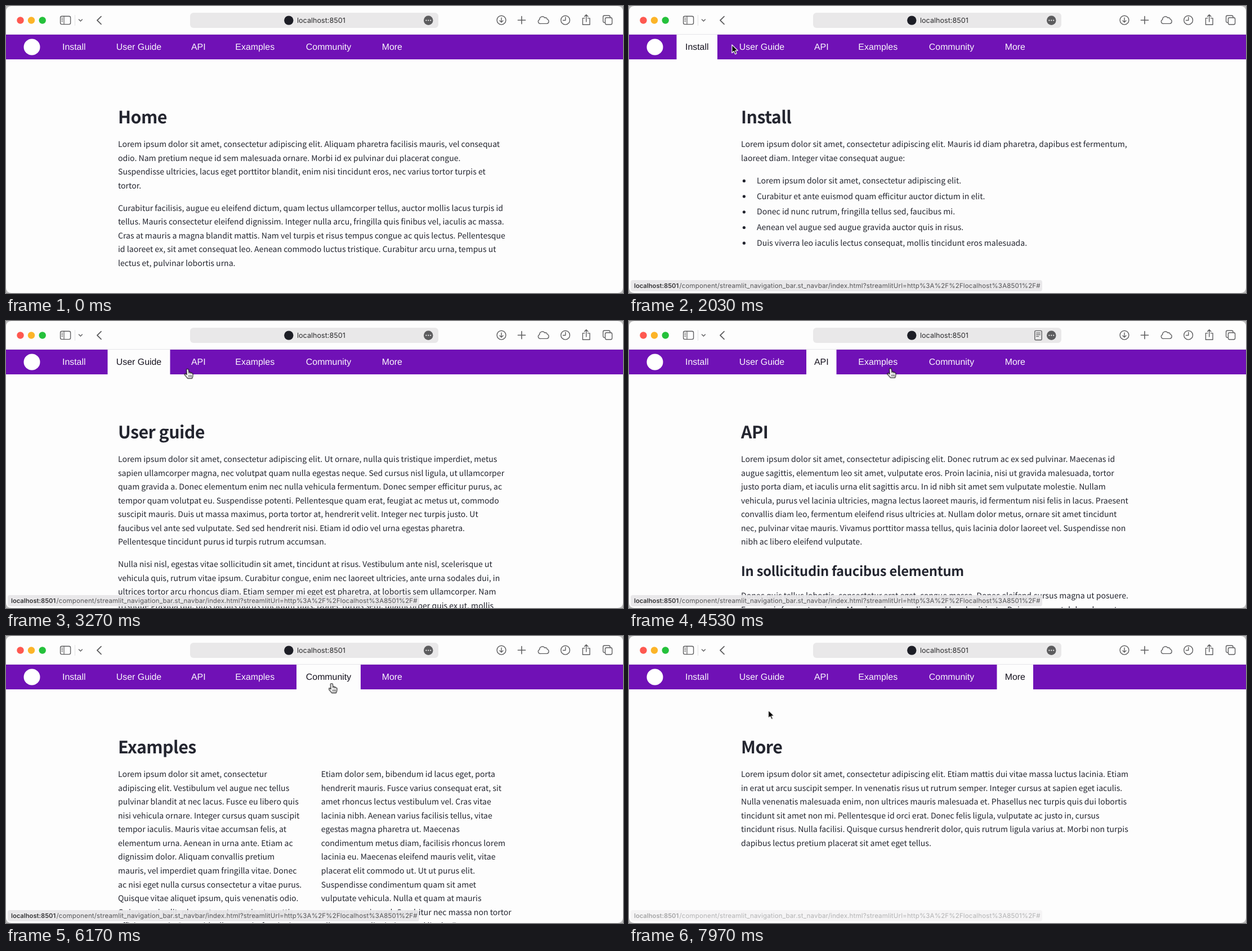
An HTML page for the animation above (8000 ms loop, 1096 by 511 pixels).

```html
<!DOCTYPE html>
<html lang="en">
<head>
<meta charset="utf-8">
<title>Navigation bar</title>
<style>
html, body { margin: 0; width: 100%; height: 100%; overflow: hidden; background: #bdbdbd; }
svg { display: block; width: 100vw; height: 100vh; text-rendering: geometricPrecision; }
.copy { font: 400 14.07px "Noto Sans CJK JP", "Noto Sans CJK SC", "Noto Sans CJK", sans-serif; fill: #23252f; }
.copy .h1 { font-size: 30.4px; font-weight: 700; letter-spacing: -.018em; }
.copy .h2 { font-size: 23.7px; font-weight: 700; letter-spacing: -.01em; }
.nav { font: 15.9px "Liberation Sans", Arial, sans-serif; text-anchor: middle; fill: #faf7fd; }
.nav .tab { fill: #16131f; }
.ui { font-family: Inter, Roboto, sans-serif; }
.icon { fill: none; stroke: #5f5f61; stroke-width: 1.4; stroke-linecap: round; stroke-linejoin: round; }
#status { animation: status 8s linear infinite; }
#cursor { animation: move 8s ease-in-out infinite; }
@keyframes status {
  0%, 9.6% { opacity: 0 }
  11.6%, 97.5% { opacity: 1 }
  99.6% { opacity: .45 }
  100% { opacity: .36 }
}
@keyframes move {
  0%, 6.5% { transform: translate(148px, 18px) }
  10% { transform: translate(136px, 54px) }
  13.375% { transform: translate(130.5px, 58.5px) }
  16%, 20% { transform: translate(122px, 72px); animation-timing-function: ease-in }
  25.375% { transform: translate(182.5px, 69px); animation-timing-function: ease-out }
  29%, 34.5% { transform: translate(238px, 82px) }
  40.875% { transform: translate(322.5px, 85.5px) }
  43.5%, 49.5% { transform: translate(341px, 84px) }
  56.625% { transform: translate(464.5px, 84.5px) }
  60%, 65% { transform: translate(456px, 84px) }
  73.5%, 80.5% { transform: translate(578.5px, 84.5px) }
  88%, 92.8% { transform: translate(688px, 83px) }
  99.625% { transform: translate(247.5px, 132px) }
  100% { transform: translate(246px, 133px) }
}
</style>
</head>
<body>
<svg viewBox="0 0 1096 511" preserveAspectRatio="none">
  <clipPath id="window"><rect width="1096" height="511" rx="9"/></clipPath>
  <g clip-path="url(#window)">
    <rect width="1096" height="511" fill="#fdfdfd"/>
    <g id="pages" class="copy"></g>

    <path d="M0 50.5H1096" stroke="#e6e5e8"/>
    <circle cx="25.5" cy="25.5" r="6.2" fill="#fe5850"/>
    <circle cx="45" cy="25.5" r="6.2" fill="#fcb428"/>
    <circle cx="64.7" cy="25.5" r="6.2" fill="#25c13b"/>
    <rect x="327" y="12" width="441" height="27" rx="6" fill="#e9e8e9"/>
    <circle cx="502.3" cy="25.6" r="8.2" fill="#1d1e26"/>
    <text class="ui" x="517" y="30.4" font-size="12.6" fill="#2b2b2d">localhost:8501</text>
    <circle cx="750.3" cy="25.6" r="8.3" fill="#5c5c5e"/>
    <path d="M746.4 25.6h.01m3.89 0h.01m3.89 0h.01" stroke="#f4f4f4" stroke-width="2.2" stroke-linecap="round"/>
    <path d="M122.5 16V35" stroke="#e2e2e4"/>
    <g class="icon">
      <rect x="96.6" y="18.2" width="18" height="14.4" rx="2.6"/>
      <path d="M103 18.2v14.4M99 21.6h1.6m-1.6 2.8h1.6m-1.6 2.8h1.6" stroke-width="1.2"/>
      <path d="M129.4 24l3 3 3-3"/>
      <path d="M169 18.6l-7 6.9 7 6.9" stroke-width="1.8"/>
      <circle cx="880" cy="25.2" r="7.9"/>
      <path d="M880 21v8m-3-3l3 3 3-3"/>
      <path d="M916 18.6v13.2m-6.6-6.6h13.2" stroke-width="1.6"/>
      <path d="M949.5 31.4h11a4 4 0 0 0 .8-7.8 3 3 0 0 0-4.2-2.6 5.2 5.2 0 0 0-9.4 3.3 3.7 3.7 0 0 0 1.8 7.1z"/>
      <circle cx="993.6" cy="25.2" r="7.9"/>
      <path d="M993.8 20v5.5h-4.4"/>
      <path d="M1028 21.6h-3.6v11.6h12.6V21.6h-3.6M1030.7 28V15.6m-3.2 3.2l3.2-3.2 3.2 3.2"/>
      <rect x="1064.4" y="20.8" width="12.2" height="12.2" rx="2.4"/>
      <path d="M1064.4 29.4h-1.4a2.4 2.4 0 0 1-2.4-2.4v-7.6a2.4 2.4 0 0 1 2.4-2.4h7.6a2.4 2.4 0 0 1 2.4 2.4v1.4"/>
    </g>
    <g id="reader" class="icon">
      <rect x="720.8" y="17.4" width="12.4" height="16.4" rx="1.6"/>
      <path d="M723.6 21.4h6.8m-6.8 3h6.8m-6.8 3h4" stroke-width="1.1"/>
    </g>

    <rect y="51" width="1096" height="44" fill="#7011b6"/>
    <circle cx="46" cy="73" r="14.5" fill="#fff"/>
    <g id="nav" class="nav"></g>

    <g id="status" class="ui">
      <rect x="3" y="488" width="731" height="20" rx="4" fill="#e8e7e9" fill-opacity=".94"/>
      <text x="9" y="502" font-size="11.2" font-weight="600" fill="#333335">localhost:8501</text>
      <text x="89.5" y="502" font-size="11.5" letter-spacing=".16" fill="#535355">/component/streamlit_navigation_bar.st_navbar/index.html?streamlitUrl=http%3A%2F%2Flocalhost%3A8501%2F#</text>
    </g>

    <g id="cursor">
      <g id="arrow">
        <path d="M0 0V14.5L3.4 11.3 5.7 16.6 8.2 15.5 5.9 10.4 10.4 10.2Z" fill="#000" stroke="#fff" stroke-width="1.2" stroke-linejoin="round"/>
      </g>
      <g id="hand" stroke="#111" stroke-width="1.2" stroke-linejoin="round" stroke-linecap="round">
        <path d="M-2 1.6Q-2 -.2 -.1 -.2 1.6 -.2 1.8 1.6L2.3 6Q4.8 5 5.2 6.8 7.4 6.1 7.7 7.8 9.6 7.6 9.5 9.8L9.1 13.2 8 16.6H.2L-4.6 11.2Q-6 8.8 -4.2 8.4 -3 8.4 -1.4 10Z" fill="#fff"/>
        <path d="M2 11v3M4.3 11v3M6.5 11v3M2.3 6v2M5.2 6.8v1.6" fill="none" stroke-width=".9"/>
      </g>
    </g>
  </g>
</svg>
<script>
const LOOP = 8000, LEFT = 199, LINE = 24.57, GAP = 15.36, TOP = 251;
const byId = id => document.getElementById(id);
const text = (x, y, s, cls = "") => `<text x="${x}" y="${y}" class="${cls}">${s}</text>`;
const title = s => text(LEFT, 209, s, "h1");

// Lines are separated by "|", paragraphs are separate arguments.
function copy(x, y, ...paragraphs) {
  let out = "";
  for (const p of paragraphs) {
    for (const line of p.split("|")) {
      out += text(x, y, line);
      y += LINE;
    }
    y += GAP;
  }
  return out;
}

const bullets = (y, items) => items.map((s, i) =>
  `<circle cx="204.4" cy="${y - 4.4 + i * 27.7}" r="2.6"/>` + text(227, y + i * 27.7, s)).join("");

// Visible only inside the given [start, end] spans, in ms.
function show(el, ...spans) {
  const visibleAt = ms => spans.some(([start, end]) => ms >= start && ms < end);
  const times = [...new Set([0, ...spans.flat(), LOOP])];
  const frames = times.map(ms => ({ offset: ms / LOOP, opacity: +visibleAt(ms), easing: "step-end" }));
  el.animate(frames, { duration: LOOP, iterations: Infinity });
}

const pages = [
  [0, 1480, title("Home") + copy(LEFT, TOP,
    "Lorem ipsum dolor sit amet, consectetur adipiscing elit. Aliquam pharetra facilisis mauris, vel consequat|odio. Nam pretium neque id sem malesuada ornare. Morbi id ex pulvinar dui placerat congue.|Suspendisse ultricies, lacus eget porttitor blandit, enim nisi tincidunt eros, nec varius tortor turpis et|tortor.",
    "Curabitur facilisis, augue eu eleifend dictum, quam lectus ullamcorper tellus, auctor mollis lacus turpis id|tellus. Mauris consectetur eleifend dignissim. Integer nulla arcu, fringilla quis finibus vel, iaculis ac massa.|Cras at mauris a magna blandit mattis. Nam vel turpis et risus tempus congue ac quis lectus. Pellentesque|id laoreet ex, sit amet consequat leo. Aenean commodo luctus tristique. Curabitur arcu urna, tempus ut|lectus et, pulvinar lobortis urna.")],
  [1480, 2560, title("Install") + copy(LEFT, TOP,
    "Lorem ipsum dolor sit amet, consectetur adipiscing elit. Mauris id diam pharetra, dapibus est fermentum,|laoreet diam. Integer vitae consequat augue:") + bullets(315.8, [
    "Lorem ipsum dolor sit amet, consectetur adipiscing elit.",
    "Curabitur et ante euismod quam efficitur auctor dictum in elit.",
    "Donec id nunc rutrum, fringilla tellus sed, faucibus mi.",
    "Aenean vel augue sed augue gravida auctor quis in risus.",
    "Duis viverra leo iaculis lectus consequat, mollis tincidunt eros malesuada."])],
  [2560, 3790, title("User guide") + copy(LEFT, TOP,
    "Lorem ipsum dolor sit amet, consectetur adipiscing elit. Ut ornare, nulla quis tristique imperdiet, metus|sapien ullamcorper magna, nec volutpat quam nulla egestas neque. Sed cursus nisl ligula, ut ullamcorper|quam gravida a. Donec elementum enim nec nulla vehicula fermentum. Donec semper efficitur purus, ac|tempor quam volutpat eu. Suspendisse potenti. Pellentesque quam erat, feugiat ac metus ut, commodo|suscipit mauris. Duis ut massa maximus, porta tortor at, hendrerit velit. Integer nec turpis justo. Ut|faucibus vel ante sed vulputate. Sed sed hendrerit nisi. Etiam id odio vel urna egestas pharetra.|Pellentesque tincidunt purus id turpis rutrum accumsan.",
    "Nulla nisi nisl, egestas vitae sollicitudin sit amet, tincidunt at risus. Vestibulum ante nisl, scelerisque ut|vehicula quis, rutrum vitae ipsum. Curabitur congue, enim nec laoreet ultricies, ante urna sodales dui, in|ultrices tortor arcu rhoncus diam. Etiam semper mi eget est pharetra, at lobortis sem ullamcorper. Nam|tristique gravida dui, quis iaculis purus tincidunt quis. Donec turpis sem, ullamcorper quis ex ut, mollis")],
  [3790, 4990, title("API") + copy(LEFT, TOP,
    "Lorem ipsum dolor sit amet, consectetur adipiscing elit. Donec rutrum ac ex sed pulvinar. Maecenas id|augue sagittis, elementum leo sit amet, vulputate eros. Proin lacinia, nisi ut gravida malesuada, tortor|justo porta diam, et iaculis urna elit sagittis arcu. In id nibh sit amet sem vulputate molestie. Nullam|vehicula, purus vel lacinia ultricies, magna lectus laoreet mauris, id fermentum nisi felis in lacus. Praesent|convallis diam leo, fermentum eleifend risus ultricies at. Nullam dolor metus, ornare sit amet tincidunt|nec, pulvinar vitae mauris. Vivamus porttitor massa tellus, quis lacinia dolor laoreet vel. Suspendisse non|nibh ac libero eleifend vulputate.") +
    text(LEFT, 453.8, "In sollicitudin faucibus elementum", "h2") + copy(LEFT, 494.3,
    "Donec quis tellus lobortis, consectetur erat eget, congue massa. Donec eleifend cursus magna ut posuere.|Fusce quis fermentum justo. Mauris sed auctor diam, vel hendrerit justo. Duis consequat dolor placerat")],
  [4990, 6300, title("Examples") + copy(LEFT, TOP,
    "Lorem ipsum dolor sit amet, consectetur|adipiscing elit. Vestibulum vel augue nec tellus|pulvinar blandit at nec lacus. Fusce eu libero quis|nisi vehicula ornare. Integer cursus quam suscipit|tempor iaculis. Mauris vitae accumsan felis, at|elementum urna. Aenean in urna ante. Etiam ac|dignissim dolor. Aliquam convallis pretium|mauris, vel imperdiet quam fringilla vitae. Donec|ac nisi eget nulla cursus consectetur a vitae purus.|Quisque vitae aliquet ipsum, quis venenatis odio.|Quisque mi velit, placerat eget mauris ut, mattis|efficitur mauris. Donec id tellus mattis, feugiat in") + copy(559.8, TOP,
    "Etiam dolor sem, bibendum id lacus eget, porta|hendrerit mauris. Fusce varius consequat erat, sit|amet rhoncus lectus vestibulum vel. Cras vitae|lacinia nibh. Aenean varius facilisis tellus, vitae|egestas magna pharetra ut. Maecenas|condimentum metus diam, facilisis rhoncus lorem|lacinia eu. Maecenas eleifend mauris velit, vitae|placerat elit commodo ut. Ut ut purus elit.|Suspendisse condimentum quam sit amet|vulputate vehicula. Nulla et quam at mauris|accumsan euismod. Curabitur nec massa non tortor|ullamcorper dignissim ut vel ligula. Fusce")],
  [6300, 7320, title("Community") + copy(LEFT, TOP,
    "Lorem ipsum dolor sit amet, consectetur adipiscing elit. Sed vitae lectus at nisi pharetra tincidunt. Integer|id mauris sed turpis luctus ornare. Vivamus nec purus vel arcu dapibus commodo. Nulla facilisi. Donec|porta velit ut massa gravida, at cursus lorem egestas. Etiam ac sem sit amet nunc rutrum placerat.",
    "Mauris tempus ligula in odio viverra, quis blandit tellus iaculis. Aenean vel diam eget augue molestie|vulputate. Curabitur non lacus a justo suscipit mattis. Praesent sed erat ut enim sodales fermentum.|Quisque id neque vitae risus laoreet congue.")],
  [7320, LOOP, title("More") + copy(LEFT, TOP,
    "Lorem ipsum dolor sit amet, consectetur adipiscing elit. Etiam mattis dui vitae massa luctus lacinia. Etiam|in erat ut arcu suscipit semper. In venenatis risus ut rutrum semper. Integer cursus at sapien eget iaculis.|Nulla venenatis malesuada enim, non ultrices mauris malesuada et. Phasellus nec turpis quis dui lobortis|tincidunt sit amet non mi. Pellentesque id orci erat. Donec felis ligula, vulputate ac justo in, cursus|tincidunt risus. Nulla facilisi. Quisque cursus hendrerit dolor, quis rutrum ligula varius at. Morbi non turpis|dapibus lectus pretium placerat sit amet eget tellus.")]
];

// Label, left edge, right edge, time of the click.
const tabs = [
  ["Install", 84.5, 157, 1350],
  ["User Guide", 180.5, 291.5, 2430],
  ["API", 315, 368.5, 3650],
  ["Examples", 391.5, 493, 4880],
  ["Community", 516, 630, 6140],
  ["More", 653.5, 718, 7180]
];

byId("pages").innerHTML = pages.map(p => `<g>${p[2]}</g>`).join("");
pages.forEach(([start, end], i) => show(byId("pages").children[i], [start, end]));

const label = ([name, left, right]) => text((left + right) / 2, 78, name);
byId("nav").innerHTML = tabs.map(label).join("") + tabs.map(t =>
  `<g class="tab"><rect x="${t[1]}" y="51" width="${t[2] - t[1]}" height="44.5" fill="#fdfdfd"/>${label(t)}</g>`).join("");
document.querySelectorAll(".tab").forEach((el, i) =>
  show(el, [tabs[i][3], tabs[i + 1] ? tabs[i + 1][3] : LOOP]));

show(byId("reader"), [3900, 4990]);
show(byId("arrow"), [560, 780], [1830, 2070], [3100, 3200], [4190, 4260], [5480, 5580], [6720, 6820], [7540, LOOP]);
show(byId("hand"), [780, 1830], [2070, 3100], [3200, 4190], [4260, 5480], [5580, 6720], [6820, 7540]);
</script>
</body>
</html>
```
